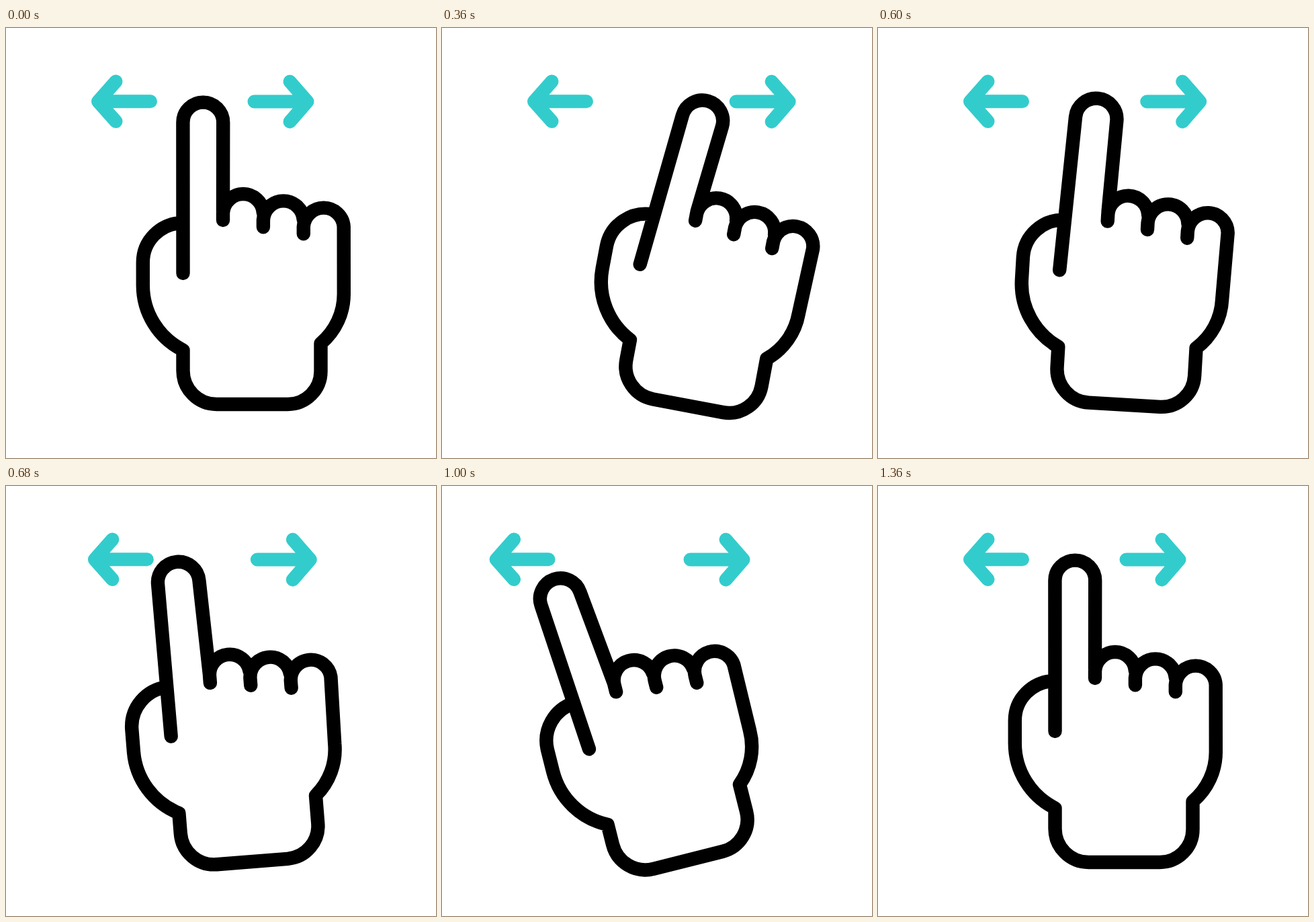
Animation of 640x640 px, one loop 1.48 s. Source, as an HTML page:

```html
<!DOCTYPE html>
<html lang="en">
<head>
<meta charset="utf-8">
<title>Swipe gesture</title>
<style>
  html, body { margin: 0; width: 100%; height: 100%; overflow: hidden; background: #fff; }
  svg { display: block; width: 100vw; height: 100vh; }
  path { fill: none; stroke: #000; stroke-width: 20.4; stroke-linecap: round; stroke-linejoin: round; }
  .arrow { stroke: #3cc; stroke-width: 20; }
</style>
</head>
<body>
<svg viewBox="0 0 640 640">
  <path class="arrow" id="left" d="M215 109.3H137M163.5 79.5L137 109.3L163.5 139"/>
  <path class="arrow" id="right" d="M369.5 109.5H448.5M422.5 79.7L448.5 109.5L422.5 139.5"/>
  <path id="hand"/>
</svg>
<script>
const LOOP = 1480, STEP = 40, STEPS = 32;
const [left, right, hand] = ['left', 'right', 'hand'].map(id => document.getElementById(id));

const clamp = (v, lo, hi) => Math.min(hi, Math.max(lo, v));
const ease = (k, from, to) => {
  const u = clamp((k - from) / (to - from), 0, 1);
  return u * u * (3 - 2 * u);
};
// Rises from 0 to 1 between start and peak, then falls back until end.
const pulse = (k, start, peak, end) => ease(k, start, peak) - ease(k, peak, end);

// Outline of the hand for the weights of its right (r) and left (l) poses.
function handPath(r, l) {
  const base = [263.5 - 7.2 * r + 0.9 * l, 365 + 1.5 * r - 1.7 * l];
  const tip = [293.3 + 17.8 * r - 19.1 * l, 140.5 - 1.4 * r - 5 * l];
  const radius = 29.9 + 0.9 * (r + l);
  const lean = (6.2 * r - 5.8 * l) * Math.PI / 180;
  const dx = radius * Math.cos(lean), dy = radius * Math.sin(lean);
  const thumbX = 203.8 - 0.6 * r;

  const knuckle = (i, y) => [
    323 + 59.9 * i + 3.6 * r + 1.2 * l,
    y + 1.4 * r / 2 ** i + (6 - 2.5 * i) * l
  ];
  let d = `M${base}L${tip[0] - dx} ${tip[1] - dy}A${radius} ${radius} 0 0 1 ${tip[0] + dx} ${tip[1] + dy}L${knuckle(0, 272)}`;
  for (let i = 0; i < 3; i++) {
    const top = 275.3 + 10.3 * i;
    d += `M${knuckle(i, 286 + 10.2 * i)}L${knuckle(i, top)}A30 30 0 0 1 ${knuckle(i + 1, top)}`;
  }
  return d + `L502.8 395A96 96 0 0 1 468.5 469.5V511A49 49 0 0 1 419.5 560` +
    `H313.5A50 50 0 0 1 263.5 510V479.5A108 108 0 0 1 ${thumbX} 383V349` +
    `A59.5 59 0 0 1 ${263 - 5 * l} ${290 + 2 * l}`;
}

function draw(now) {
  const k = clamp(Math.floor(now % LOOP / STEP) - 2, 0, STEPS);
  const r = pulse(k, 0, 9, 20), l = pulse(k, 9, 20, 31);
  hand.setAttribute('d', handPath(r, l));
  hand.setAttribute('transform', `rotate(${12.2 * r - 17.3 * l} 354 560)`);
  right.setAttribute('transform', `translate(${78 * pulse(k, 0, 9, 16)})`);
  left.setAttribute('transform', `translate(${-69 * pulse(k, 14, 20, 31)})`);
  requestAnimationFrame(() => draw(performance.now()));
}
draw(performance.now());
</script>
</body>
</html>
```
